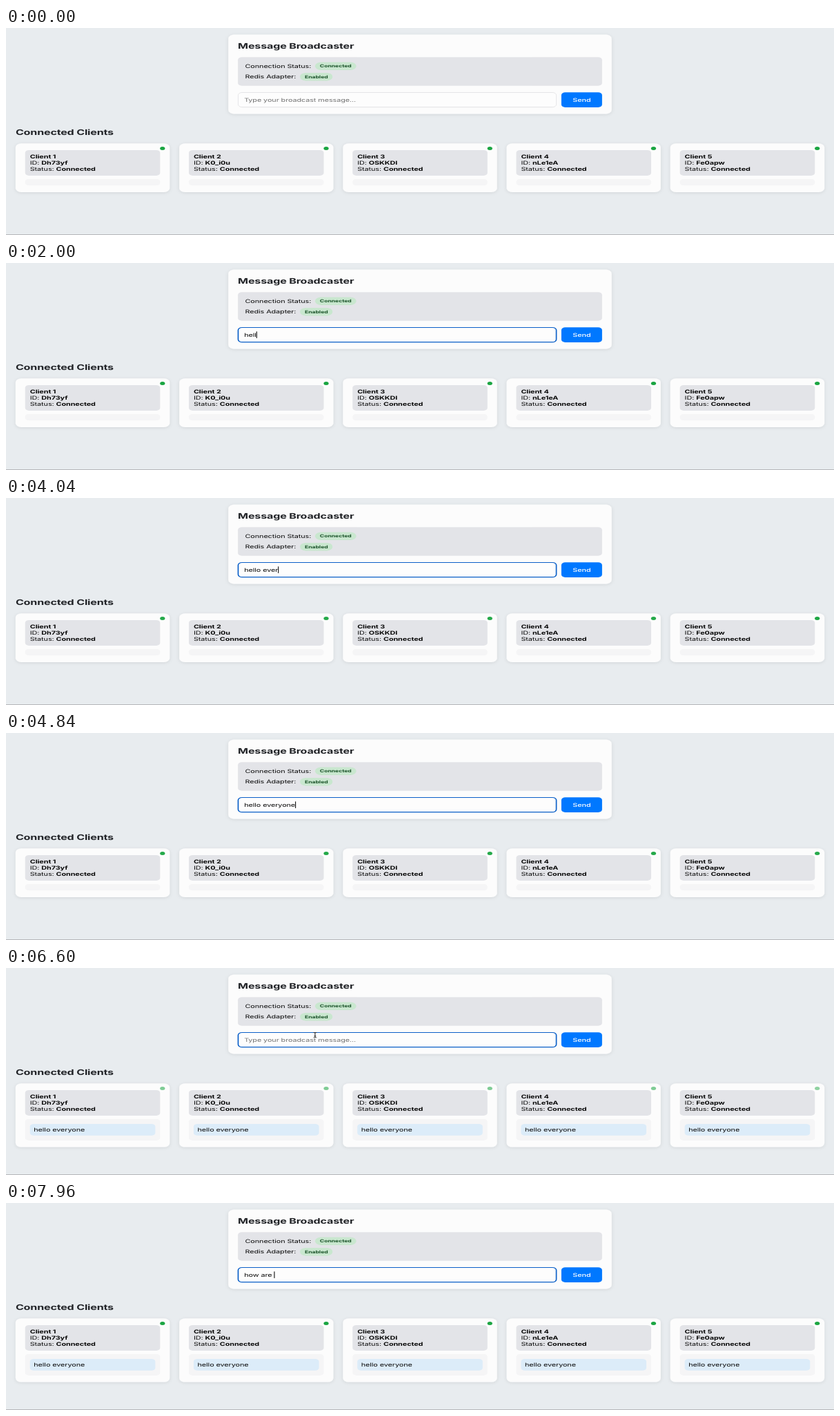
Write an HTML page that moves like this. It is 1200x300 px and loops after 8000 ms.

```html
<!DOCTYPE html>
<html lang="en">
<head>
<meta charset="utf-8">
<title>Message Broadcaster</title>
<style>
  html, body { margin: 0; width: 100%; height: 100%; overflow: hidden; background: #e8ecef; }
  svg { display: block; width: 100vw; height: 100vh; }
  text {
    font: 400 15.6px Inter, "Open Sans", sans-serif;
    letter-spacing: -.12px;
    white-space: pre;
    text-rendering: geometricPrecision;
    fill: #080808;
  }
  .bold { font-weight: 700; }
  .title { font-size: 23.2px; font-weight: 700; letter-spacing: -.27px; fill: #212327; }
  .badge { font-size: 12.4px; font-weight: 700; letter-spacing: -.05px; fill: #1a5229; }
  .button { font-weight: 500; fill: #fff; }
  .card { fill: #fcfcfc; filter: url(#shadow); }
  .info { fill: #e3e4e8; }
</style>
</head>
<body>
<!-- The page is laid out at 1728 px wide and squeezed into the stage. -->
<svg id="stage" viewBox="0 0 1728 624" preserveAspectRatio="none">
  <defs>
    <filter id="shadow" x="-10%" y="-20%" width="120%" height="140%">
      <feDropShadow dx="0" dy="2" stdDeviation="4" flood-color="#000" flood-opacity=".1"/>
    </filter>
  </defs>
</svg>
<script>
const LOOP = 8000;
const stage = document.getElementById('stage');

function add(tag, attrs, content = '', parent = stage) {
  const node = document.createElementNS('http://www.w3.org/2000/svg', tag);
  for (const key in attrs) node.setAttribute(key, attrs[key]);
  node.textContent = content;
  return parent.appendChild(node);
}
const box = (x, y, width, height, rx, attrs, parent) =>
  add('rect', { x, y, width, height, rx, ...attrs }, '', parent);
const label = (x, y, content, cls = '', parent) =>
  add('text', { x, y, class: cls }, content, parent);
const show = (node, on) => node.setAttribute('visibility', on ? 'visible' : 'hidden');

// Broadcaster panel
box(0, 0, 1728, 624, 0, { fill: '#e8ecef' });
box(464, 20, 800, 239, 12, { class: 'card' });
label(484, 62.5, 'Message Broadcaster', 'title');
box(484, 88, 760, 86, 8, { class: 'info' });

function statusRow(baseline, name, badgeX, badgeWidth, value) {
  label(499, baseline, name);
  box(badgeX, baseline - 17, badgeWidth, 24, 12, { fill: '#c9e7cf' });
  label(badgeX + 10, baseline - .5, value, 'badge');
}
statusRow(120, 'Connection Status:', 645, 86, 'Connected');
statusRow(152, 'Redis Adapter:', 613.5, 68, 'Enabled');

const field = box(484.5, 194.5, 664, 44, 8, { fill: '#fdfdfd' });
const fieldText = label(497, 222, '');
const caret = box(0, 206.5, 1.5, 20, 0, { fill: '#000' });
box(1159, 194, 85, 45, 8, { fill: '#0078ff' });
label(1201.5, 222, 'Send', 'button').setAttribute('text-anchor', 'middle');

// Client cards
label(20, 322, 'Connected Clients', 'title');
const cards = ['Dh73yf', 'K0_i0u', 'OSKKDI', 'nLe1eA', 'Fe0apw'].map((id, i) => {
  const g = add('g', { transform: `translate(${20 + i * 341.6} 348)` });
  const line = (baseline, name, value) => {
    const text = label(30, baseline, name, '', g);
    add('tspan', { class: 'bold' }, value, text);
  };
  const body = box(0, 0, 321.6, 147, 12, { class: 'card' }, g);
  box(20, 20, 281.6, 77, 8, { class: 'info' }, g);
  line(45, '', 'Client ' + (i + 1));
  line(64, 'ID: ', id);
  line(83, 'Status: ', 'Connected');
  const inbox = box(20, 107, 281.6, 20, 8, { fill: '#f5f5f6' }, g);
  const message = add('g', {}, '', g);
  box(30, 122, 261.6, 35, 8, { fill: '#dcecf9' }, message);
  label(38, 145, 'hello everyone', '', message);
  const dot = add('circle', { cx: 306.6, cy: 15, r: 5.2, fill: '#1aa541' }, '', g);
  return { body, inbox, message, dot, delay: i === 4 ? 25 : 0 };
});

box(0, 622, 1728, 2, 0, { fill: '#b4b6b8' });

// Pointers
const arrow = add('path', {
  d: 'M0 0V17L4 13.4L6.6 19.4L9.2 18.2L6.6 12.4H12Z',
  fill: '#000', stroke: '#fff', 'stroke-width': 1.2
});
const beam = add('path', {
  d: 'M-3.5 -8Q0 -8 0 -6Q0 -8 3.5 -8M0 -6V6M-3.5 8Q0 8 0 6Q0 8 3.5 8M-2 3H2',
  fill: 'none', stroke: '#222', 'stroke-width': 1.5
});

// Input: [time, key]; '<' erases one character, '!' sends.
const FOCUS = 860, SENT = 5320;
const keys = [
  [1640, 'h'], [1740, 'e'], [1840, 'l'], [1940, 'l'], [2080, 'o'], [2300, ' '],
  [2920, 'e'], [3120, 'r'], [3400, '<'], [3560, 'v'], [3720, 'e'], [3880, 'r'],
  [4080, 'y'], [4300, 'o'], [4500, 'n'], [4700, 'e'], [SENT, '!'],
  [7000, 'h'], [7100, 'o'], [7220, 'w'], [7340, ' '], [7480, 'a'], [7620, 'r'],
  [7740, 'e'], [7880, ' ']
];

function typed(t) {
  let value = '', last = FOCUS;
  for (const [time, key] of keys) {
    if (time > t) break;
    value = key === '!' ? '' : key === '<' ? value.slice(0, -1) : value + key;
    last = time;
  }
  return { value, last };
}

// Pointer trips: start, end, hidden at, from, to
const trips = [
  { start: 40, end: 760, hide: 1640, from: [690, 505], to: [668, 227] },
  { start: 6000, end: 6500, hide: 7000, from: [668, 227], to: [645, 202] }
];

// CSS "ease" curve, solved by bisection
function ease(x) {
  let lo = 0, hi = 1;
  const bez = (s, a, b) => 3 * s * (1 - s) ** 2 * a + 3 * s * s * (1 - s) * b + s ** 3;
  for (let i = 0; i < 20; i++) {
    const mid = (lo + hi) / 2;
    if (bez(mid, .25, .25) < x) lo = mid; else hi = mid;
  }
  return bez(lo, .1, 1);
}

function pulse(t) {
  const phase = ((t + 1000) % 1000) / 500;
  const dip = phase < 1 ? ease(phase) : 1 - ease(phase - 1);
  return 1 - .64 * dip;
}

function drawInput(t) {
  const focused = t >= FOCUS;
  const { value, last } = typed(t);
  field.setAttribute('stroke', focused ? '#0a5fc8' : '#dcdcde');
  field.setAttribute('stroke-width', focused ? 2.4 : 1.2);
  fieldText.textContent = value || 'Type your broadcast message...';
  fieldText.style.fill = value ? '#080808' : '#717171';
  const width = value ? fieldText.getComputedTextLength() : 0;
  caret.setAttribute('x', 497 + width);
  show(caret, focused && (t - last) % 500 < 250);
}

function drawPointer(t) {
  const trip = trips.find(p => t >= p.start && t < p.hide);
  show(arrow, false);
  show(beam, false);
  if (!trip) return;
  const k = ease(Math.min(1, (t - trip.start) / (trip.end - trip.start)));
  const [x, y] = trip.from.map((a, i) => a + (trip.to[i] - a) * k);
  const pointer = y < 239 ? beam : arrow;
  pointer.setAttribute('transform', `translate(${x} ${y})`);
  show(pointer, true);
}

function drawCards(t) {
  const received = t >= SENT;
  for (const card of cards) {
    card.body.setAttribute('height', received ? 192 : 147);
    card.inbox.setAttribute('height', received ? 65 : 20);
    show(card.message, received);
    card.dot.setAttribute('opacity', pulse(t - card.delay));
  }
}

function draw(t) {
  drawInput(t);
  drawPointer(t);
  drawCards(t);
}

const began = performance.now();
function tick() {
  draw((performance.now() - began) % LOOP);
  requestAnimationFrame(tick);
}
tick();
</script>
</body>
</html>
```
